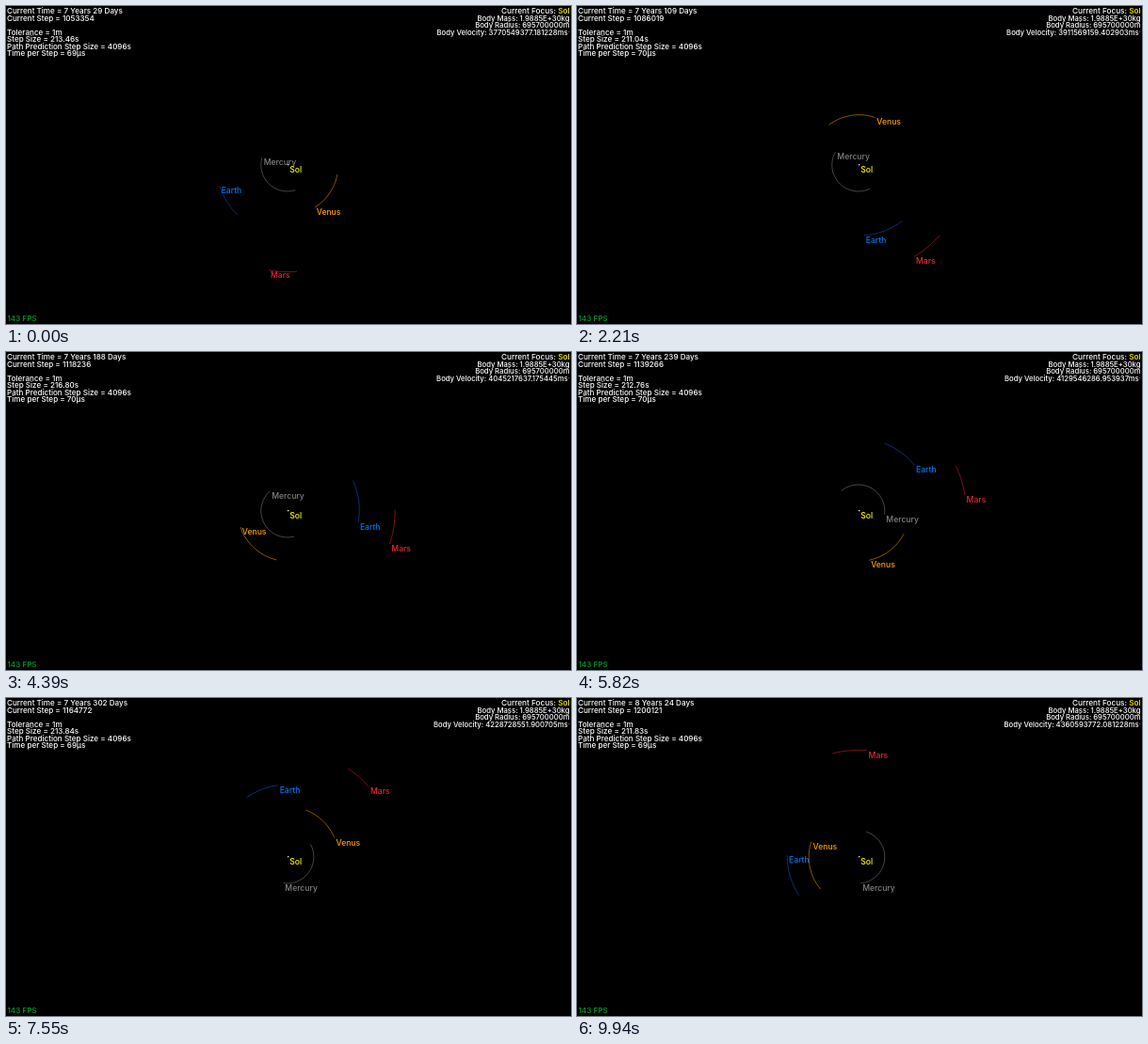
An HTML page that plays this animation: 600 px wide and 338 px high, repeating every 9970 ms.

```html
<!DOCTYPE html>
<html lang="en">
<head>
<meta charset="utf-8">
<title>Orbit simulation</title>
<style>
  html, body { margin: 0; width: 100%; height: 100%; overflow: hidden; background: #000; }
  svg { display: block; width: 100%; height: 100%; }
  text { font: 500 8.1px Inter, Roboto, sans-serif; fill: #fff; white-space: pre; }
  .name { font-size: 8.6px; }
  .right { font-size: 7.7px; text-anchor: end; }
  path { fill: none; stroke-width: 1; stroke-opacity: .55; }
</style>
</head>
<body>
<svg id="stage" viewBox="0 0 600 338"></svg>
<script>
const LOOP = 9970, FPS = 33, LAST = 328, RAD = Math.PI / 180;
const SUN = { x: 299.5, y: 169 };
const YELLOW = '#fdf900';

// Angles in degrees, rate in degrees per day
const planets = [
  { name: 'Mercury', color: '#828282', a: 28, e: .025, peri: 0, start: 163.6, rate: 4.314 },
  { name: 'Venus', color: '#ffa100', a: 53.3, e: 0, peri: 0, start: -57.7, rate: 1.611 },
  { name: 'Earth', color: '#0079f1', line: '#1c5ad8', a: 76, e: .013, peri: 284, start: 198.4, rate: .949 },
  { name: 'Mars', color: '#e62937', a: 113.6, e: 0, peri: 0, start: 259.7, rate: .517 }
];

const stage = document.getElementById('stage');

function add(tag, attrs, content = '') {
  const node = document.createElementNS('http://www.w3.org/2000/svg', tag);
  for (const key in attrs) node.setAttribute(key, attrs[key]);
  node.textContent = content;
  return stage.appendChild(node);
}

const row = i => 8.2 + 7.5 * i;
const left = (i, s) => add('text', { x: 1, y: row(i) }, s);
const right = (i, s) => add('text', { x: 598.5, y: row(i), class: 'right' }, s);

function noise(n) {
  const v = Math.sin(n * 12.9898 + 1) * 43758.5453;
  return (v - Math.floor(v)) * 2 - 1;
}

function locate(p, days) {
  const mean = p.start + p.rate * days;
  const anomaly = (mean - p.peri) * RAD;
  const angle = mean * RAD + 2 * p.e * Math.sin(anomaly);
  const r = p.a * (1 - p.e * Math.cos(anomaly));
  return { x: SUN.x + r * Math.cos(angle), y: SUN.y - r * Math.sin(angle) };
}

function pathAhead(p, days, span) {
  const n = 36;
  const points = Array.from({ length: n + 1 }, (_, i) => {
    const q = locate(p, days + span * i / n);
    return q.x.toFixed(2) + ' ' + q.y.toFixed(2);
  });
  return 'M' + points.join('L');
}

for (const p of planets) p.trail = add('path', { stroke: p.line || p.color });
add('rect', { x: 299, y: 168, width: 1.3, height: 1.3, fill: '#fffbb0' });
for (const p of planets) p.label = add('text', { class: 'name', style: 'fill:' + p.color }, p.name);
add('text', { x: SUN.x + 1.8, y: SUN.y + 8, class: 'name', style: 'fill:' + YELLOW }, 'Sol');

const clock = left(0), count = left(1);
left(3, 'Tolerance = 1m');
const size = left(4);
left(5, 'Path Prediction Step Size = 4096s');
const cost = left(6);

const focus = right(0);
focus.style.fontSize = '8.2px';
focus.innerHTML = `Current Focus: <tspan style="fill:${YELLOW}">Sol</tspan>`;
right(1, 'Body Mass: 1.9885E+30kg');
right(2, 'Body Radius: 695700000m');
const speed = right(3);
speed.innerHTML = 'Body Velocity: <tspan></tspan>ms<tspan dy="-2" font-size="4">-</tspan>';
const speedValue = speed.querySelector('tspan');

add('text', { x: 1.5, y: 334.8, style: 'fill:#009e2f' }, '143 FPS');

function draw(tick) {
  const u = tick / LAST;
  const days = 360 * u;
  const span = 33 - 4 * Math.cos(tick / 38);
  for (const p of planets) {
    const at = locate(p, days);
    p.trail.setAttribute('d', pathAhead(p, days, span));
    p.label.setAttribute('x', at.x + 1.8);
    p.label.setAttribute('y', at.y + 8);
  }
  const date = 29.2 + days;
  const velocity = 3770549377.181228 + 590044394.9 * (u + .095 * u * (1 - u));
  clock.textContent = `Current Time = ${7 + Math.floor(date / 365)} Years ${Math.floor(date % 365)} Days`;
  count.textContent = `Current Step = ${Math.round(1053354 + 146767 * u)}`;
  size.textContent = `Step Size = ${(213 + 5 * noise(tick)).toFixed(2)}s`;
  cost.textContent = `Time per Step = ${Math.round(68 + 3 * noise(tick + .5))}µs`;
  speedValue.textContent = velocity.toFixed(6);
}

let shown = -1;
function frame(now) {
  const t = Math.floor((now % LOOP) / 10) * 10;
  const tick = Math.min(LAST, Math.floor((t + 5) * FPS / 1000));
  if (tick !== shown) draw(shown = tick);
  requestAnimationFrame(frame);
}
frame(performance.now());
</script>
</body>
</html>
```
